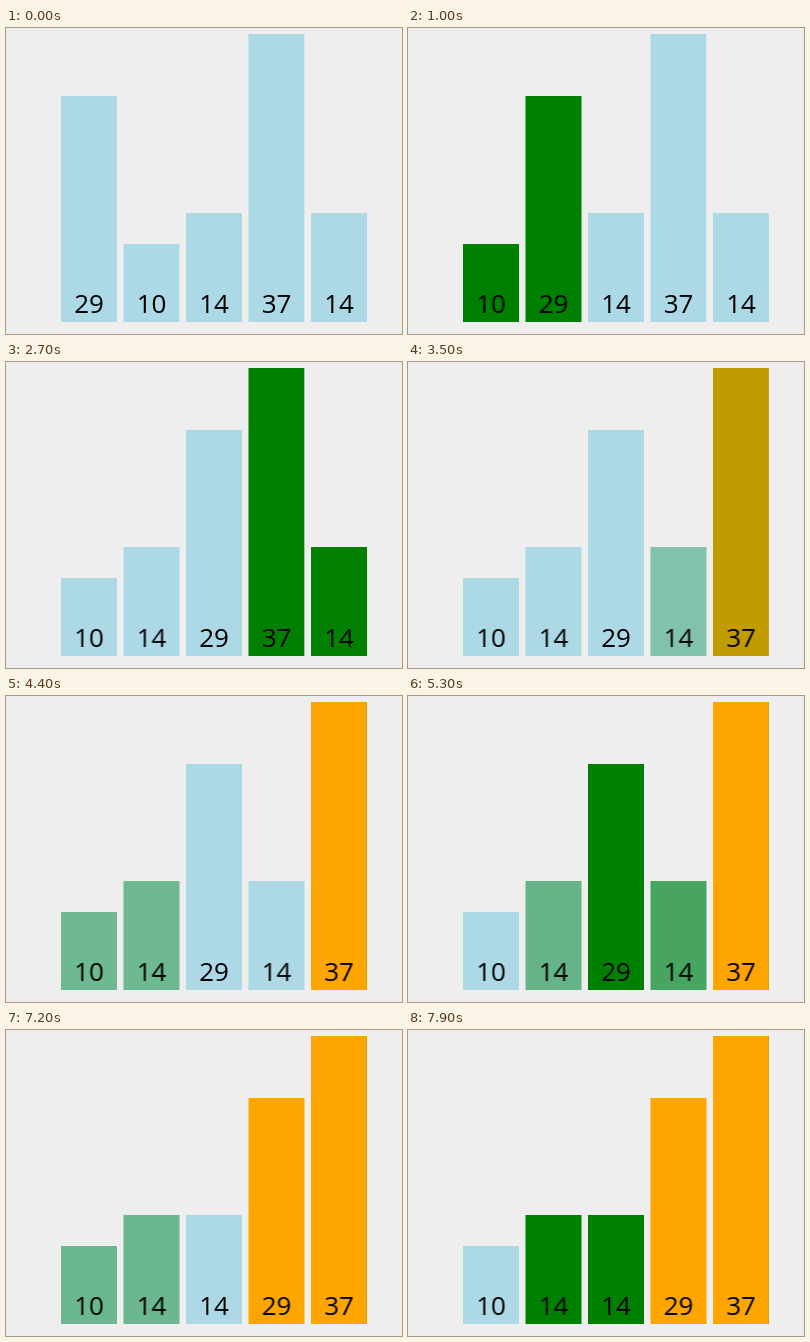
Write an HTML page that moves like this. It is 396 by 306 pixels and loops after 8 s.

```html
<!DOCTYPE html>
<html lang="en">
<head>
<meta charset="utf-8">
<title>Bubble sort</title>
<style>
  html, body { margin: 0; width: 100%; height: 100%; overflow: hidden; background: #eee; }
  .bar {
    position: absolute;
    left: 55px;
    bottom: calc(100% - 294px);
    width: 56px;
    background: lightblue;
    color: #000;
    font: 26px/38px "Open Sans", "Noto Sans", sans-serif;
    text-align: center;
  }
  .bar span { position: absolute; left: 0; right: 0; bottom: 0; }
</style>
</head>
<body>
<script>
const LOOP = 8000, FADE = 300, STEP = 62.5, UNIT = 7.78;
const IDLE = 'lightblue', ACTIVE = 'green', SORTED = 'orange';

// Each change is [start in ms, new slot or colour].
const bars = [
  { value: 29, slot: 0,
    moves: [[560, 1], [1495, 2], [5630, 3]],
    colors: [[130, ACTIVE], [2430, IDLE], [4760, ACTIVE], [6130, SORTED]] },
  { value: 10, slot: 1,
    moves: [[560, 0]],
    colors: [[130, ACTIVE], [1060, IDLE], [4332, ACTIVE], [4760, IDLE], [7130, ACTIVE], [7560, IDLE]] },
  { value: 14, slot: 2,
    moves: [[1495, 1]],
    colors: [[1060, ACTIVE], [1995, IDLE], [4332, ACTIVE], [5200, IDLE], [7130, ACTIVE]] },
  { value: 37, slot: 3,
    moves: [[2865, 4]],
    colors: [[1995, ACTIVE], [3365, SORTED]] },
  { value: 14, slot: 4,
    moves: [[2865, 3], [5630, 2]],
    colors: [[2430, ACTIVE], [3365, IDLE], [5200, ACTIVE], [6130, IDLE], [7560, ACTIVE]] }
];

function keyframes(name, first, changes, declare) {
  const frame = (ms, value) => `${ms / LOOP * 100}% { ${declare(value)} }`;
  let current = first;
  const frames = [frame(0, first)];
  for (const [start, next] of changes) {
    frames.push(frame(start, current), frame(start + FADE, next));
    current = next;
  }
  frames.push(frame(LOOP, current));
  return `@keyframes ${name} { ${frames.join(' ')} }`;
}

const sheet = document.createElement('style');
bars.forEach(({ value, slot, moves, colors }, i) => {
  sheet.textContent +=
    keyframes(`move${i}`, slot, moves, s => `transform: translateX(${s * STEP}px)`) +
    keyframes(`color${i}`, IDLE, colors, c => `background-color: ${c}`);
  const bar = document.createElement('div');
  bar.className = 'bar';
  bar.style.height = `${value * UNIT}px`;
  bar.style.animation = `move${i} ${LOOP}ms ease infinite, color${i} ${LOOP}ms ease infinite`;
  bar.innerHTML = `<span>${value}</span>`;
  document.body.append(bar);
});
document.head.append(sheet);
</script>
</body>
</html>
```
